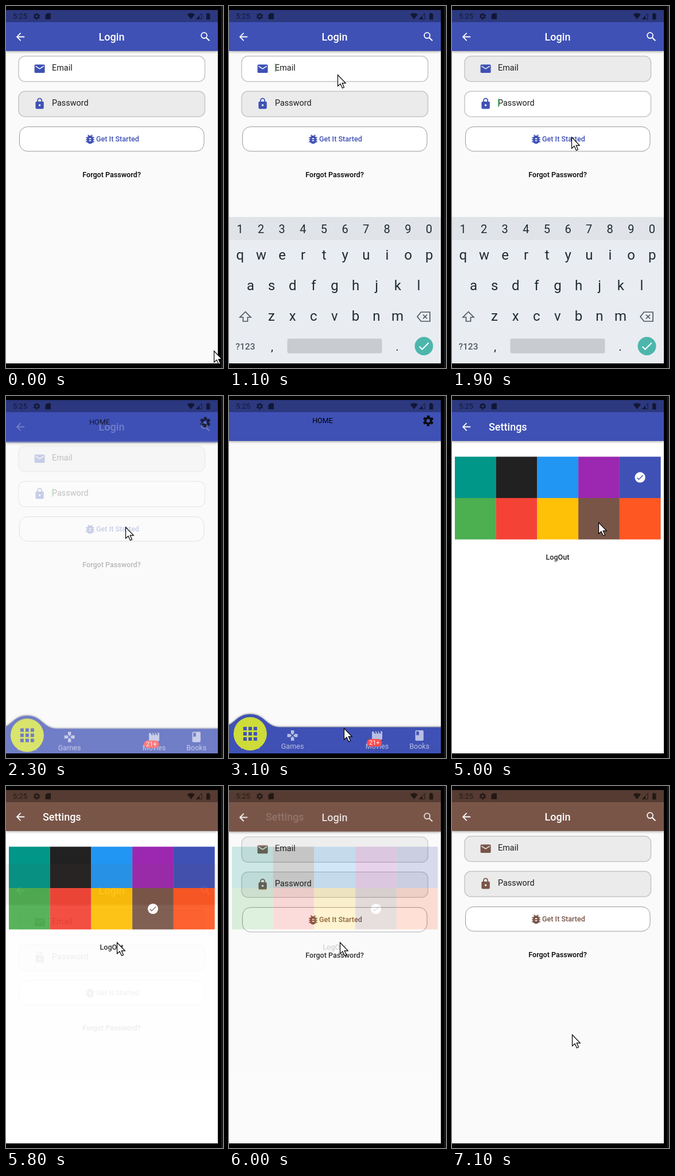
Animation, 378 px wide and 628 px high, one loop 7.2 s. Source, as an HTML page:

```html
<!DOCTYPE html>
<html lang="en">
<head>
<meta charset="utf-8">
<title>App demo</title>
<style>
  html, body { margin: 0; width: 100%; height: 100%; overflow: hidden; background: #000; }
  svg { display: block; width: 378px; height: 628px; font-family: Roboto, sans-serif; }
  .mid { text-anchor: middle; }
  .title { font-size: 18px; font-weight: 500; fill: #fff; }
  .label { font-size: 14.4px; fill: #1c1c1c; }
  .button { font-size: 12.57px; font-weight: 500; }
  .small { font-size: 12.57px; }
  .bar { filter: drop-shadow(0 1px 2px rgba(0, 0, 0, .4)); }
  .nav { filter: drop-shadow(0 -1px 1.5px rgba(0, 0, 0, .4)); }
  .field { stroke: #c6c6c6; stroke-width: 1.5; }
  .line { fill: none; stroke: currentColor; }
</style>
</head>
<body>
<svg id="stage" viewBox="0 0 378 628"></svg>
<script>
const LOOP = 7200, STEP = 100;
const INDIGO = [63, 81, 181], BROWN = [121, 85, 72];
const TABS = ['Home', 'Games', 'Apps', 'Movies', 'Books'];
const SWATCHES = ['#009688', '#212121', '#2196f3', '#9c27b0', '#3f51b5',
                  '#4caf50', '#f44336', '#ffc107', '#795548', '#ff5722'];

// Icons live on a 24 unit grid.
const path = d => `<path d="${d}"/>`;
const ICONS = {
  back: path('M20 11H7.83l5.59-5.59L12 4l-8 8 8 8 1.41-1.41L7.83 13H20z'),
  search: `<g class="line" stroke-width="2"><circle cx="9.5" cy="9.5" r="5.5"/><path d="M13.8 13.8L19.8 19.8" stroke-width="2.3"/></g>`,
  gear: `<g class="line"><circle cx="12" cy="12" r="5.4" stroke-width="4"/>
    <circle cx="12" cy="12" r="8.4" stroke-width="3.2" stroke-dasharray="4.7 4.096" transform="rotate(14 12 12)"/></g>`,
  mail: path('M20 4H4c-1.1 0-2 .9-2 2v12c0 1.1.9 2 2 2h16c1.1 0 2-.9 2-2V6c0-1.1-.9-2-2-2zm0 4l-8 5-8-5V6l8 5 8-5z'),
  lock: `<rect x="4" y="8" width="16" height="14" rx="2"/><path class="line" stroke-width="2" d="M8 9V6a4 4 0 0 1 8 0V9"/>
    <circle cx="12" cy="15" r="2" fill="#eee"/>`,
  bug: `<rect x="6" y="5" width="12" height="16" rx="6"/>
    <path class="line" stroke-width="2" d="M4 9H20M4 13H20M4 17H20M7.7 3.7L10 6M16.3 3.7L14 6"/>
    <path d="M10 11H14M10 15H14" stroke="#fff" stroke-width="2"/>`,
  Home: path('M10 20v-6h4v6h5v-8h3L12 3 2 12h3v8z'),
  Games: path('M15 7.5V2H9v5.5l3 3zM7.5 9H2v6h5.5l3-3zM9 16.5V22h6v-5.5l-3-3zM16.5 9l-3 3 3 3H22V9z'),
  Apps: `<path class="line" stroke-width="4" stroke-dasharray="4 2" d="M4 6H20M4 12H20M4 18H20"/>`,
  Movies: path('M18 4l2 4h-3l-2-4h-2l2 4h-3l-2-4H8l2 4H7L5 4H4a2 2 0 0 0-2 2v12a2 2 0 0 0 2 2h16a2 2 0 0 0 2-2V4z'),
  Books: path('M18 2H6a2 2 0 0 0-2 2v16a2 2 0 0 0 2 2h12a2 2 0 0 0 2-2V4a2 2 0 0 0-2-2zM6 4h5v8l-2.5-1.5L6 12z'),
  check: path('M9 16.17L4.83 12l-1.42 1.41L9 19 21 7l-1.41-1.41z'),
  shift: `<path class="line" stroke-width="1.7" d="M12 3.5L2.5 13H8V20H16V13H21.5z"/>`,
  erase: `<path class="line" stroke-width="1.7" d="M23 4H7.500L1 12L7.500 20H23zM11 8.500L18 15.500M18 8.500L11 15.500"/>`
};

const icon = (name, cx, cy, color = 'currentColor', k = .898) =>
  `<g color="${color}" fill="${color}" transform="translate(${cx} ${cy}) scale(${k}) translate(-12 -12)">${ICONS[name]}</g>`;
const text = (str, x, y, cls, fill) =>
  `<text x="${x}" y="${y}" class="${cls}"${fill ? ` fill="${fill}"` : ''}>${str}</text>`;
const rect = (x, y, w, h, fill, more = '') =>
  `<rect x="${x}" y="${y}" width="${w}" height="${h}" fill="${fill}" ${more}/>`;
const page = (id, bg, body) =>
  `<g id="${id}">${rect(0, 7, 369, 613, bg)}${rect(0, 7, 369, 71, 'currentColor', 'class="bar"')}${body}</g>`;

const login = page('login', '#fafafa', `
  ${icon('back', 25, 53.5, '#fff')}${icon('search', 347.3, 53.3, '#fff')}
  ${text('Login', 184, 60, 'title mid')}
  ${rect(22, 87, 324.5, 44, '#ebebeb', 'rx="11" class="field" id="email"')}
  ${rect(22, 148, 324.5, 44, '#ebebeb', 'rx="11" class="field" id="password"')}
  ${icon('mail', 58.6, 108.8)}${icon('lock', 58.6, 169.4)}
  ${text('Email', 80, 112, 'label')}${text('Password', 80, 173, 'label')}
  ${rect(80.2, 0, 1.6, 14, '#4caf50', 'id="caret"')}
  ${rect(23.5, 209.5, 321.5, 42.5, '#fff', 'rx="14" stroke="#9a9a9a"')}
  ${icon('bug', 146.5, 231)}
  ${text('Get It Started', 157, 235.3, 'button', 'currentColor')}
  ${text('Forgot Password?', 184, 296.5, 'button mid', '#000')}`);

const tabX = i => 36.9 + 73.7 * i;
const home = page('home', '#fafafa', `
  ${text('HOME', 163, 47.3, 'small mid', '#000')}${icon('gear', 347, 43, '#0a0a0a', .93)}
  <path id="hump" class="nav" fill="currentColor"/>
  ${TABS.map((name, i) => `<g class="tab">${icon(name, tabX(i), 589, '#b8bee3', .9)}
    ${text(name, tabX(i), 611.5, 'small mid', '#b8bee3')}</g>`).join('')}
  ${rect(240, 595, 26.500, 13, '#ff4d4f', 'rx="6.5"')}
  ${text('21+', 253.2, 605.4, 'mid', '#fff" font-size="10.8')}
  <g id="bubble"><circle cy="586" r="29" fill="#cddc39"/>
    <g class="pick">${icon('Home', 0, 586, 'currentColor', 1.45)}</g>
    <g class="pick">${icon('Apps', 0, 586, 'currentColor', 1.5)}</g></g>`);

const settings = page('settings', '#fff', `
  ${icon('back', 25, 53.5, '#fff')}${text('Settings', 64, 60, 'title')}
  ${SWATCHES.map((c, i) => rect(5 + i % 5 * 71.7, 105.3 + (i > 4) * 71.7, 71.8, 71.8, c)).join('')}
  <g id="mark"><circle r="9.1" fill="#fff"/>${icon('check', -.3, 0, 'currentColor', .64)}</g>
  ${text('LogOut', 184, 284, 'button mid', '#222')}`);

const keyRow = (keys, x, y, size) => [...keys].map((k, i) =>
  text(k, x + 36.6 * i, y, 'mid', `#1f2a30" font-size="${size}`)).join('');
const keyboard = `<g id="keyboard">
  ${rect(0, 366, 369, 254, '#e9edf1')}${rect(0, 366, 369, 40, '#e0e4e8')}
  ${keyRow('1234567890', 19, 394, 20)}
  ${keyRow('qwertyuiop', 19.3, 440, 24)}
  ${keyRow('asdfghjkl', 37.6, 492.500, 24)}
  ${keyRow('zxcvbnm', 74, 545.500, 24)}
  ${icon('shift', 28.500, 539, '#4d585e', 1)}${icon('erase', 339, 539, '#4d585e', 1)}
  ${text('?123', 28.500, 595.500, 'mid', '#4d585e" font-weight="500" font-size="15.500')}
  ${text(',', 75, 598, 'mid', '#1f2a30" font-size="21')}${text('.', 293, 598, 'mid', '#1f2a30" font-size="21')}
  ${rect(101.500, 577, 165, 25.500, '#c8ccd0', 'rx="3"')}
  <circle cx="339.5" cy="590" r="16" fill="#4db6ac"/>${icon('check', 339.500, 590, '#fff', 1)}</g>`;

const status = `${rect(0, 7, 369, 21, '#000', 'opacity=".3"')}
  <g opacity=".58">${text('5:25', 12, 22.3, '', '#000" font-size="13')}
    ${icon('gear', 53.5, 17.8, '#000', .58)}
    <path d="M71.500 12.500H78V23H68.500V15.500z"/>
    <path d="M315.500 14.500Q322.300 10 329 14.500L322.300 23z"/>
    <path d="M341 12.800V22.500H331.500z" fill="none" stroke="#000"/><path d="M337 17V22.500H331.500z"/>
    <path d="M349 13.500H350.500V12H353.500V13.500H355.500V23.500H349z"/></g>`;

const stage = document.getElementById('stage');
stage.innerHTML = `
  <clipPath id="screen"><rect y="7" width="369" height="613"/></clipPath>
  ${rect(0, 0, 378, 628, '#000')}${rect(374.500, 0, 3.500, 628, '#171717')}
  <g clip-path="url(#screen)"><g id="pages">${login}${home}${settings}</g>${keyboard}${status}</g>
  <path id="cursor" fill="#fff" stroke="#000" stroke-width="1.2" d="M.5.5V20L5 16L8.500 23.500L11.500 22L8.200 14.800H14.200z"/>`;

const el = {};
stage.querySelectorAll('[id]').forEach(n => el[n.id] = n);
const tabs = stage.querySelectorAll('.tab'), picks = stage.querySelectorAll('.pick');

const clamp = v => Math.min(1, Math.max(0, v));
const mix = (a, b, p) => a + (b - a) * p;
const span = (t, from, length) => clamp((t - from) / length);

function bezier(x1, y1, x2, y2) {
  const at = (a, b, s) => 3 * a * s * (1 - s) ** 2 + 3 * b * s * s * (1 - s) + s ** 3;
  return x => {
    let lo = 0, hi = 1;
    for (let i = 0; i < 24; i++) {
      const m = (lo + hi) / 2;
      if (at(x1, x2, m) < x) lo = m; else hi = m;
    }
    return at(y1, y2, (lo + hi) / 2);
  };
}
const easeIn = bezier(.42, 0, 1, 1);
const easeInOut = bezier(.42, 0, .58, 1);
const settle = bezier(.4, 0, .2, 1);

// time, x, y of the pointer tip
const MOVES = [
  [0, 362, 598], [100, 362, 598], [800, 190, 112], [1000, 190, 112], [1400, 185, 170],
  [1500, 185, 170], [1900, 208, 227], [2300, 208, 227], [3000, 200, 576], [3500, 200, 576],
  [4400, 330, 84], [4500, 343, 44], [4600, 343, 44], [5000, 255, 219], [5200, 255, 219],
  [5500, 193, 271], [6000, 193, 271], [6400, 200, 330], [7100, 209, 431]
];

function pointer(t) {
  const i = Math.max(1, MOVES.findIndex(m => m[0] >= t));
  const [a, b] = [MOVES[i - 1], MOVES[i]];
  const p = easeInOut(span(t, a[0], b[0] - a[0]));
  return [mix(a[1], b[1], p), mix(a[2], b[2], p)];
}

// Pages rise a quarter of the screen while fading in.
function enter(node, t, start) {
  const p = span(t, start, 300);
  node.style.display = p > 0 ? '' : 'none';
  node.setAttribute('opacity', p < 1 ? easeIn(p) : 1);
  node.setAttribute('transform', `translate(0 ${153 * (1 - settle(p))})`);
}

function draw(t) {
  const loggedOut = t >= 5700;
  const tint = span(t, 5100, 200);
  stage.style.color = `rgb(${INDIGO.map((c, i) => Math.round(mix(c, BROWN[i], tint)))})`;

  const order = loggedOut ? ['home', 'settings', 'login'] : ['login', 'home', 'settings'];
  el.pages.append(...order.map(id => el[id]));
  enter(el.login, t, loggedOut ? 5735 : -300);
  enter(el.home, t, 2050);
  enter(el.settings, t, 4510);

  const onEmail = t < 1400, onPassword = !onEmail && !loggedOut;
  el.email.setAttribute('fill', onEmail ? '#fff' : '#ebebeb');
  el.password.setAttribute('fill', onPassword ? '#fff' : '#ebebeb');
  el.caret.setAttribute('y', onEmail ? 100 : 161);
  el.caret.style.display = t >= 900 && !loggedOut ? '' : 'none';

  const up = settle(span(t, 850, 250)) * (1 - settle(span(t, 2050, 250)));
  el.keyboard.setAttribute('transform', `translate(0 ${256 * (1 - up)})`);

  const slide = easeInOut(span(t, 3250, 300));
  const x = mix(tabX(0), tabX(2), slide), chosen = slide > 0 ? 2 : 0;
  el.hump.setAttribute('d', `M-60 574.500H${x - 52}C${x - 28} 574.500 ${x - 26} 552 ${x} 552
    S${x + 28} 574.500 ${x + 52} 574.500H430V640H-60z`);
  el.bubble.setAttribute('transform', `translate(${x} 0)`);
  tabs.forEach((n, i) => n.style.display = i === chosen ? 'none' : '');
  picks.forEach((n, i) => n.style.display = i * 2 === chosen ? '' : 'none');

  el.mark.setAttribute('transform', t < 5100 ? 'translate(327.6 141.2)' : 'translate(256 213)');
  el.cursor.setAttribute('transform', `translate(${pointer(t).map(Math.round)})`);
}

const start = performance.now();
function tick() {
  const t = (performance.now() - start + 4) % LOOP;
  draw(Math.floor(t / STEP) * STEP);
  requestAnimationFrame(tick);
}
tick();
</script>
</body>
</html>
```
